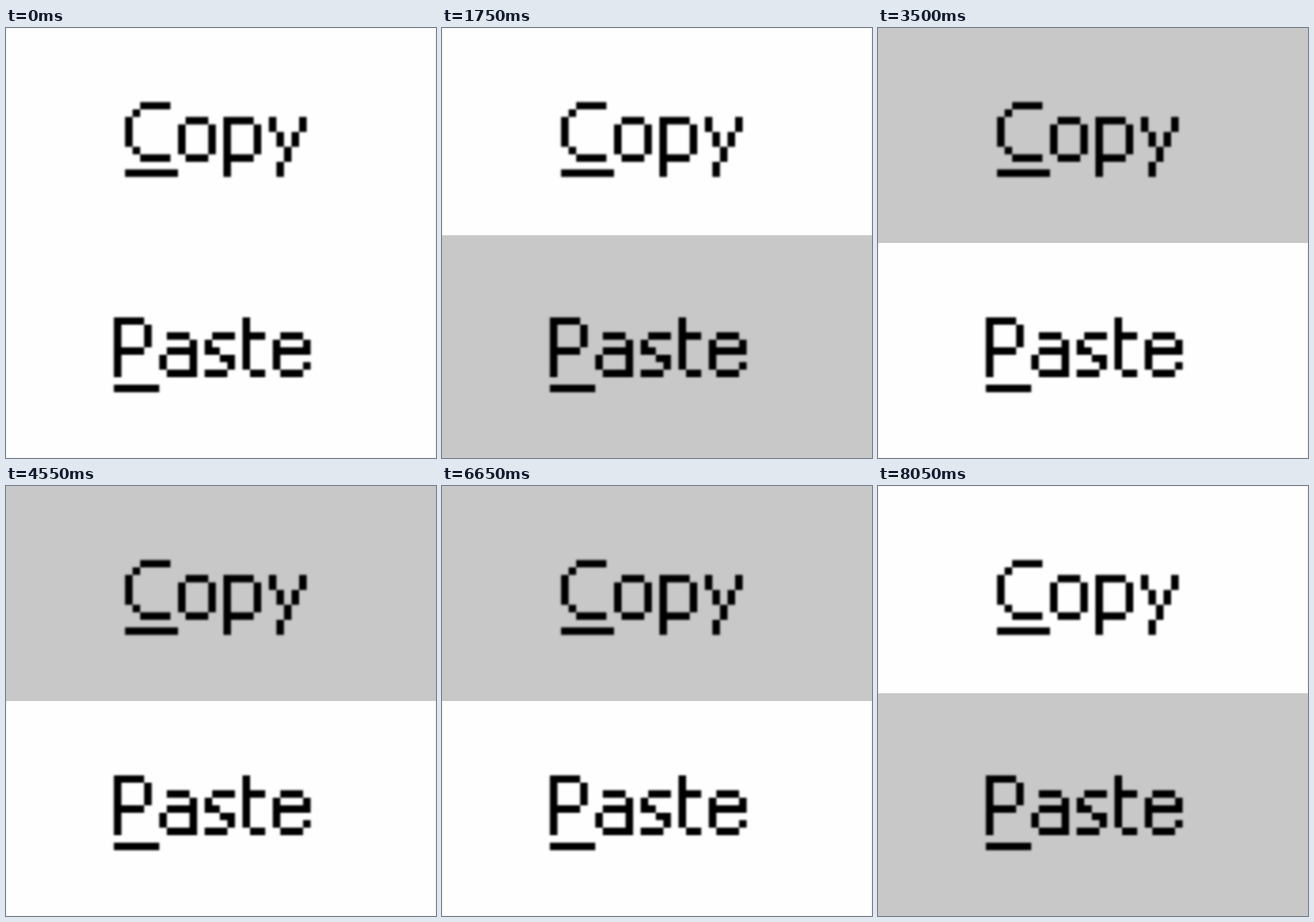
An HTML page that plays this animation: 500x500 px, repeating every 8.33 s.

```html
<!DOCTYPE html>
<html lang="en">
<head>
<meta charset="utf-8">
<title>Copy Paste</title>
<style>
  html, body { margin: 0; width: 100%; height: 100%; overflow: hidden; background: #fefefe; }
  svg { display: block; width: 100vw; height: 100vh; }
  .words { fill: none; stroke: #000; filter: blur(.8px); }
</style>
</head>
<body>
<svg viewBox="0 0 500 500" role="img" aria-label="Copy, Paste">
  <rect width="500" height="500" fill="#fefefe"/>
  <path d="M.5 .5H499.5V499.5H.5Z" fill="none" stroke="#f6f6f6"/>
  <rect id="copy" width="500" height="250" fill="#c8c8c8"/>
  <rect id="paste" y="241" width="500" height="259" fill="#c8c8c8"/>
  <!-- Pixel lettering: one unit is one font pixel -->
  <g class="words">
    <path transform="translate(138.4 86) scale(8.8 8.7)" d="
      M2 .5h4M1.5 1v1M.5 2v4M1.5 6v1M2 7.5h4M0 9.5h7
      M8 2.5h3M7.5 3v4M11.5 3v4M8 7.5h3
      M13.5 2v8M14 2.5h3M17.5 3v4M14 7.5h3
      M19.5 2v2M23.5 2v2M20.5 4v2M22.5 4v2M21.5 6v2M20.5 8v2"/>
    <path transform="translate(125.4 336.4) scale(8.8 8.7)" d="
      M.5 0v8M1 .5h3M4.5 1v3M1 4.5h3M0 9.5h6
      M7 2.5h3M10.5 3v5M7 4.5h3M6.5 5v2M7 7.5h3
      M13 2.5h3M12.5 3v1M12 4.5h2M14 5.5h2M15.5 6v1M12 7.5h3
      M17.5 0v7M18 2.5h2M18 7.5h2
      M21.5 3v4M22 2.5h3M25.5 3v2M22 4.5h3M25.5 6v1M22 7.5h3"/>
  </g>
</svg>
<script>
  const LOOP = 8330, STEP = 350;
  const copy = document.getElementById("copy");
  const paste = document.getElementById("paste");
  const start = performance.now();

  // Each cycle: nothing selected, then Copy, then Paste
  function draw() {
    const time = (performance.now() - start) % LOOP;
    const phase = Math.floor(time / STEP) % 3;
    copy.style.display = phase === 1 ? "" : "none";
    paste.style.display = phase === 2 ? "" : "none";
    requestAnimationFrame(draw);
  }
  draw();
</script>
</body>
</html>
```
